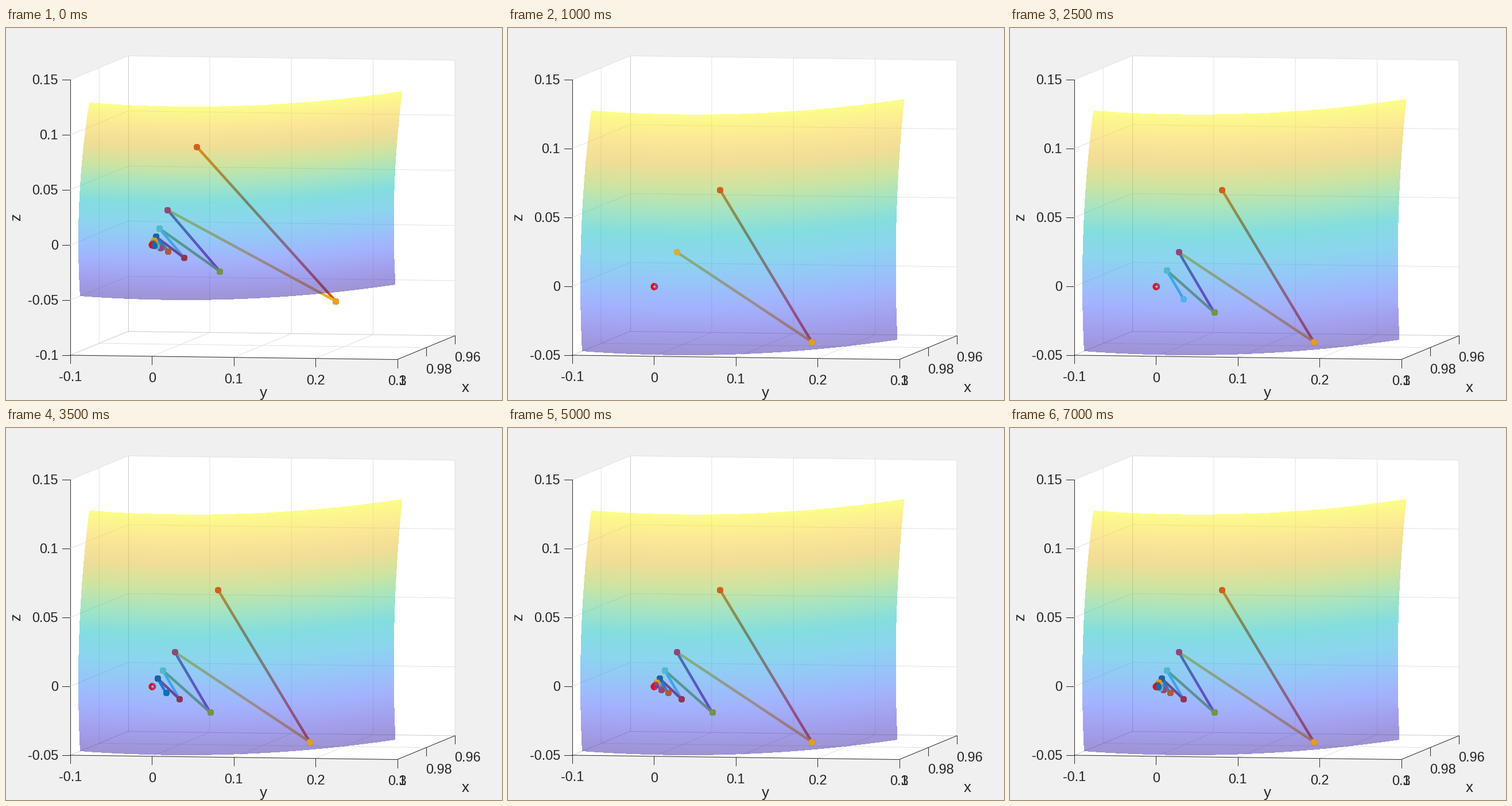
A matplotlib script for the animation above (7.5 s loop, 864 px wide and 648 px high).

```python
import numpy as np
import matplotlib.pyplot as plt
from matplotlib.animation import FuncAnimation
from matplotlib.colors import LinearSegmentedColormap
from matplotlib.patches import Polygon, Wedge

W, H, DPI = 864, 648, 100
PT = 72 / DPI
STEPS, STEP_MS = 15, 500
INK, GRID, EDGE = "#262626", "#e1e1e1", "#cccccc"
CYCLE = ["#D95319", "#EDB120", "#7E2F8E", "#77AC30",
         "#4DBEEE", "#A2142F", "#0072BD"]
HEAT = LinearSegmentedColormap.from_list("heat", [
    "#3e26a8", "#4641de", "#4667fd", "#2d8cf3", "#18addf", "#08bcc0",
    "#4cca86", "#a0c940", "#e4bc2d", "#f9d22e", "#f9fb15"])

plt.rcParams["font.family"] = "Liberation Sans"
fig = plt.figure(figsize=(W / DPI, H / DPI), dpi=DPI, facecolor="#f0f0f0")
ax = fig.add_axes([0, 0, 1, 1])
ax.axis("off")


def line(pts, color, width=1, z=1, **kw):
    x, y = zip(*pts)
    return ax.plot(x, y, color=color, lw=width * PT, zorder=z, **kw)[0]


def label(x, y, s, size=23.5, ha="center", va="center_baseline", **kw):
    return ax.text(x, y, s, fontsize=size * PT, color=INK, ha=ha, va=va, **kw)


def project(d, u, h):
    """Unit box (depth, across, height) to pixels."""
    return 112 + 569.5 * u + 100.5 * d, 570 + 7.5 * u - 41.5 * d - 480 * h


def path(color, *corners):
    return line([project(*c) for c in corners], color)


def wall(*corners):
    ax.add_patch(Polygon([project(*c) for c in corners], fc="white",
                         ec="none", zorder=0))


def text_of(v):
    return f"{round(v, 2) + 0:g}"


def draw_box():
    wall((1, 0, 0), (1, 1, 0), (1, 1, 1), (1, 0, 1))
    wall((0, 0, 0), (1, 0, 0), (1, 0, 1), (0, 0, 1))
    wall((0, 0, 0), (0, 1, 0), (1, 1, 0), (1, 0, 0))
    for u in (.25, .5, .75):
        path(GRID, (0, u, 0), (1, u, 0), (1, u, 1))
    path(GRID, (.5, 0, 1), (.5, 0, 0), (.5, 1, 0))
    path(GRID, (0, 0, 1), (1, 0, 1), (1, 1, 1), (1, 1, 0))
    path(EDGE, (0, 0, 0), (1, 0, 0), (1, 1, 0))
    path(EDGE, (1, 0, 0), (1, 0, 1))
    path(INK, (0, 0, 1), (0, 0, 0))
    path(INK, (0, 0, 0), (0, 1, 0), (1, 1, 0))

    def tick(d, u, s, dx):
        x, y = project(d, u, 0)
        line([(x, y), (x, y + 14)], INK)
        label(x + dx, y + 36, s)

    for u in np.linspace(0, 1, 5):
        tick(0, u, text_of(.4 * u - .1), 0)
    for d in (0, .5, 1):
        s = text_of(1 - .04 * d)
        tick(d, 1, s, 4 + 4.6 * len(s))
    label(448.5, 633.5, "y", 26)
    label(800.5, 625, "x", 26)
    label(18, 329, "z", 26, va="center", rotation=90)


def height_scale(zmin):
    """Ticks, labels and grid lines of the z axis."""
    out = []
    n = round((.15 - zmin) / .05)
    for i in range(n + 1):
        h = i / n
        x, y = project(0, 0, h)
        out.append(line([(x - 14, y), (x, y)], INK))
        out.append(label(91, y - 1, text_of(zmin + .05 * i), ha="right"))
        if 0 < i < n:
            out.append(path(GRID, (0, 0, h), (1, 0, h), (1, 1, h)))
    return out


def surface(top, bottom):
    """Half transparent curved sheet, shaded by height."""
    X, Y = np.meshgrid(np.arange(W) + .5, np.arange(H) + .5)
    v = np.full(X.shape, .5)
    for _ in range(6):
        left = 145 - 53.1 * v + 37.1 * v ** 2
        right = 690.5 - 43.4 * v + 31.4 * v ** 2
        u = (X - left) / (right - left)
        bend = 41 * u - 61 * u ** 2
        v = np.clip((Y - top - bend) / (bottom - top), -.2, 1.2)
    rgba = HEAT(np.clip(1 - v, 0, 1))
    inside = (u >= 0) & (u <= 1) & (v >= 0) & (v <= 1)
    rgba[..., 3] = np.where(inside, .5, 0)
    return ax.imshow(rgba, extent=(0, W, H, 0), interpolation="nearest",
                     aspect="auto", zorder=20)


def ring(x, y):
    """Red marker whose left half stands in front of the sheet."""
    style = dict(width=4.4, fc="red", ec="none")
    return [ax.add_patch(Wedge((x, y), 6.4, 0, 360, zorder=2, **style)),
            ax.add_patch(Wedge((x, y), 6.4, 90, 270, zorder=30, **style))]


def stars(ends, color, z, alpha=1):
    return line(ends, color, z=z, ls="none", marker=(8, 2, 0),
                ms=11 * PT, mew=3.5 * PT, alpha=alpha)


def settle(start, limit, k):
    """Offset after k rounds: nearly halved each time, faster at first."""
    limit = np.array(limit)
    return np.array(start) * .5 ** k * (limit + (1 - limit) * .16 ** k)


def zigzag(centre, upper, lower):
    """Segments jumping between two sides while closing in on the centre."""
    pts = []
    for k in range(STEPS // 2 + 1):
        pts.append(centre + settle(upper, (.62, .655), k))
        pts.append(centre + settle(lower, (.685, .93), k))
    segs = []
    for k in range(STEPS - 1):
        ends, color, z = pts[k:k + 2], CYCLE[k % len(CYCLE)], k * .1
        segs.append([line(ends, color, 4.6, 3 + z, solid_capstyle="butt"),
                     stars(ends, color, 3.05 + z),
                     stars(ends, color, 21 + z, .78)])
    return segs


draw_box()
wide = height_scale(-.1) + [surface(130, 467)] + ring(255, 378)
wide_path = zigzag(np.array([255, 377.5]), (77, -171), (319, 98))
tight = height_scale(-.05) + [surface(143.8, 563)] + ring(255, 450.5)
tight_path = zigzag(np.array([255, 450]), (114, -168.5), (274, 96.5))
ax.set_xlim(0, W)
ax.set_ylim(H, 0)


def show(artists, on):
    for a in artists:
        a.set_visible(on)


def update(i):
    show(wide, i == 0)
    show(tight, i > 0)
    for seg in wide_path:
        show(seg, i == 0)
    for k, seg in enumerate(tight_path):
        show(seg, k < i)
    return []


anim = FuncAnimation(fig, update, frames=STEPS, interval=STEP_MS,
                     init_func=lambda: update(0), repeat=True, repeat_delay=0)
plt.show()
```
